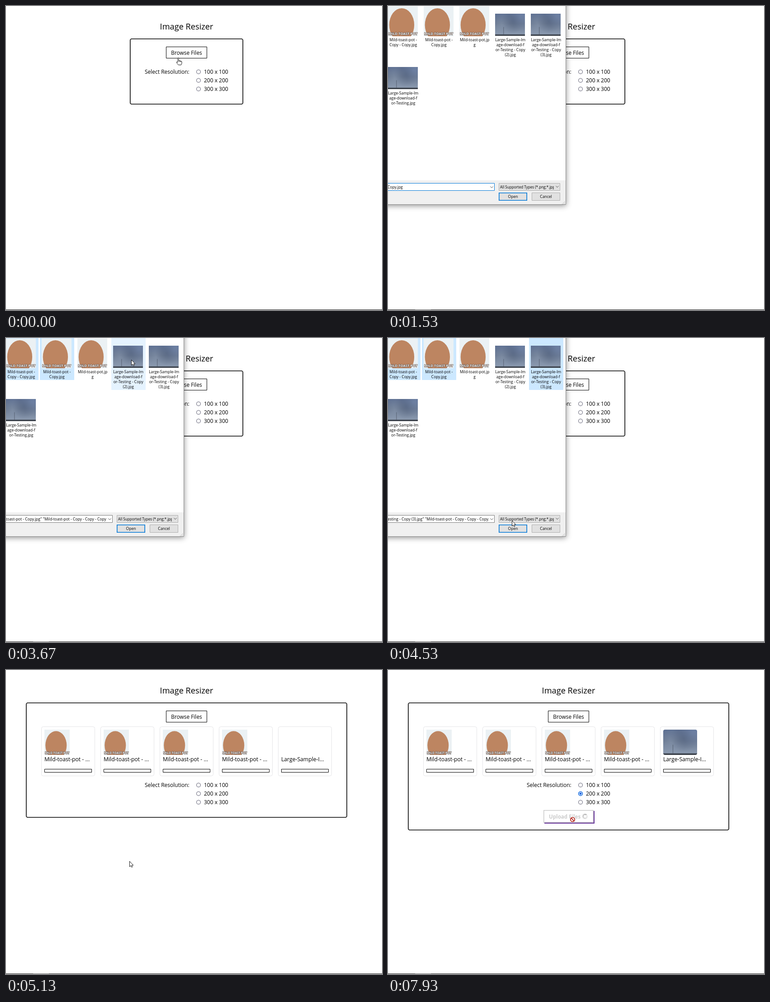
Write an HTML page with a canvas that moves like this. It is 832 px wide and 673 px high and loops after 8000 ms.

```html
<!DOCTYPE html>
<html lang="en">
<head>
<meta charset="utf-8">
<title>Image Resizer</title>
<style>
html, body { margin: 0; width: 100%; height: 100%; overflow: hidden; background: #fff; }
canvas { display: block; }
</style>
</head>
<body>
<canvas id="stage" width="832" height="673"></canvas>
<script>
const ctx = document.getElementById('stage').getContext('2d');
const LOOP = 8000;
const NAME = 'Mild-toast-pot';
const clamp = v => Math.max(0, Math.min(1, v));
const ramp = (t, from, to) => clamp((t - from) / (to - from));

// Pointer waypoints: time, x, y of the tip.
const PATH = [
  [1930, -12, 40], [2130, 20, 44], [2330, 34, 46], [2600, 137, 77], [2730, 137, 77],
  [2800, 86, 54], [2870, 99, 44], [3330, 99, 44], [3800, 345, 50], [4070, 345, 50],
  [4530, 274, 404], [4680, 273, 422], [5130, 273, 423], [5330, 273, 423],
  [5730, 348, 306], [5800, 348, 306], [5870, 347, 292], [6200, 347, 292],
  [6270, 363, 288], [6670, 443, 267], [7070, 443, 267], [7530, 405, 325], [8000, 405, 325]
];
const ARROW = new Path2D('M.5 .5V12.5L3.2 10 5 13.7 6.9 12.9 5.2 9.2H8.7Z');
const HAND = new Path2D('M3.5 1.7a1.2 1.2 0 0 1 2.4 0V7l5 1q1.6 .4 1.6 2v3l-1.5 3.5h-6L1 11.6q-1-1.7.5-2l2 1.4ZM6 7v2M8.3 7.5v2M10.5 8v2');

function text(str, x, y, size = 12, { color = '#000', align = 'left', weight = '' } = {}) {
  ctx.font = `${weight} ${size}px "Open Sans", "Noto Sans", sans-serif`;
  ctx.textAlign = align;
  ctx.fillStyle = color;
  ctx.fillText(str, x, y);
}

function box(x, y, w, h, { fill, stroke, line = 1, radius = 0 } = {}) {
  const inset = stroke ? line / 2 : 0;
  ctx.beginPath();
  ctx.roundRect(x + inset, y + inset, w - 2 * inset, h - 2 * inset, radius);
  if (fill) { ctx.fillStyle = fill; ctx.fill(); }
  if (stroke) { ctx.strokeStyle = stroke; ctx.lineWidth = line; ctx.stroke(); }
}

function clipped(x, y, w, h, draw, radius = 0) {
  ctx.save();
  ctx.beginPath();
  ctx.roundRect(x, y, w, h, radius);
  ctx.clip();
  draw();
  ctx.restore();
}

function ellipse(x, y, rx, ry, color) {
  ctx.beginPath();
  ctx.ellipse(x, y, rx, ry, 0, 0, 7);
  ctx.fillStyle = color;
  ctx.fill();
}

function portrait(x, y, s) {
  clipped(x, y, s, s, () => {
    box(x, y, s, s, { fill: '#ebf1f4' });
    ellipse(x + s * .46, y + s * .62, s * .42, s * .56, '#bd8561');
    ctx.font = `bold ${s * .118}px "Open Sans", sans-serif`;
    ctx.textAlign = 'center';
    ctx.strokeStyle = '#5a4a42';
    ctx.lineWidth = 1.4;
    ctx.lineJoin = 'round';
    const caption = NAME.replaceAll('-', ' ').toUpperCase();
    ctx.strokeText(caption, x + s / 2, y + s * .96);
    ctx.fillStyle = '#fff';
    ctx.fillText(caption, x + s / 2, y + s * .96);
  });
}

function landscape(x, y, w, h, radius) {
  clipped(x, y, w, h, () => {
    const sky = ctx.createLinearGradient(0, y, 0, y + h);
    [[0, '#5f7193'], [.45, '#67768f'], [.92, '#8a99af'], [.95, '#454c57'], [1, '#2c3139']]
      .forEach(([stop, color]) => sky.addColorStop(stop, color));
    box(x, y, w, h, { fill: sky });
    const glow = (cx, cy, color) => {
      const light = ctx.createRadialGradient(x + w * cx, y + h * cy, 0, x + w * cx, y + h * cy, w * .4);
      light.addColorStop(0, color + '70');
      light.addColorStop(1, color + '00');
      box(x, y, w, h * .93, { fill: light });
    };
    glow(.25, .5, '#94a3b8');
    glow(.85, .15, '#8298c0');
    glow(.6, .35, '#4b5a75');
    box(x + w * .28, y + h * .6, .7, h * .34, { fill: '#434c5a' });
  }, radius);
}

function radio(x, y, state) {
  const color = { on: '#0060df', pressed: '#4f4f5b' }[state] || '#8f8f9d';
  ctx.beginPath();
  ctx.arc(x, y, 4.4, 0, 7);
  ctx.strokeStyle = color;
  ctx.lineWidth = 1.5;
  ctx.stroke();
  if (state) ellipse(x, y, 2.4, 2.4, state === 'on' ? color : '#cfcfd8');
}

function uploadButton(t) {
  const busy = t >= 7730;
  const w = busy ? 111 : 93, h = busy ? 28 : 27;
  const x = busy ? 344 : 353, y = 310;
  box(x + 2, y + 2, w, h, { fill: 'rebeccapurple' });
  box(x, y, w, h, { fill: '#fff', stroke: busy ? '#ccc' : 'rebeccapurple', line: 1.6 });
  text('Upload Files', x + 12, y + 18.5, 11.6, { color: busy ? '#ccc' : 'rebeccapurple', weight: 'bold' });
  if (!busy) return;
  const turn = Math.floor(t / 83);
  ctx.lineWidth = 1;
  for (let i = 0; i < 12; i++) {
    const a = i * Math.PI / 6, c = Math.cos(a), s = Math.sin(a);
    ctx.strokeStyle = `rgba(70,70,70,${.25 + ((i - turn) % 12 + 12) % 12 / 16})`;
    ctx.beginPath();
    ctx.moveTo(436 + 3.2 * c, 324 + 3.2 * s);
    ctx.lineTo(436 + 6 * c, 324 + 6 * s);
    ctx.stroke();
  }
}

function page(t) {
  const filled = t >= 5000, ready = t >= 7070, shift = filled ? 109 : 0;
  text('Image Resizer', 399.5, 52, 18.2, { align: 'center' });
  const height = t >= 7730 ? 283 : ready ? 282 : filled ? 255 : 146;
  box(filled ? 44 : 274, 72, filled ? 711 : 251, height, { stroke: '#000', line: 1.6, radius: 3.5 });
  box(354, 90, 91, 26, { stroke: '#000' });
  text('Browse Files', 399.5, 108, 11.9, { align: 'center' });

  for (let i = 0; filled && i < 5; i++) {
    const x = Math.round(77.6 + i * 131.2);
    box(x, 125, 119, 110, { stroke: '#e4e4e7', radius: 4 });
    if (i < 4) portrait(x + 7, 132, 56);
    else if (t >= 5330) landscape(x + 7, 132, 75, 56, 4);
    text(i < 4 ? NAME + ' - ...' : 'Large-Sample-I...', x + 7, 202, 12.2);
    box(x + 7, 219, 105, 8, { stroke: '#000' });
  }

  text('Select Resolution:', 307, 149.5 + shift);
  [100, 200, 300].forEach((size, i) => {
    const y = 145.7 + i * 19 + shift;
    radio(426, y, i === 1 && (ready ? 'on' : t >= 6870 && 'pressed'));
    text(`${size} x ${size}`, 438, y + 4);
  });
  if (ready) uploadButton(t);

  box(0, 672, 832, 1, { fill: '#1c1c1c' });
  if (t >= 70) box(60, 672, 35, 1, { fill: '#5c5c5c' });
}

const sample = end => ['Large-Sample-Im', 'age-download-f', ...end];
const FILES = [
  { x: 0, y: 1, label: [NAME + ' -', 'Copy - Copy.jpg'], selectedAt: 2330 },
  { x: 79, y: 1, label: [NAME + ' -', 'Copy.jpg'], selectedAt: 3200 },
  { x: 158, y: 1, label: [NAME + '.jp', 'g'] },
  { x: 237, y: 1, wide: true, label: sample(['or-Testing - Copy', '(2).jpg']) },
  { x: 316, y: 1, wide: true, label: sample(['or-Testing - Copy', '(3).jpg']), selectedAt: 3930 },
  { x: 0, y: 119, wide: true, label: sample(['or-Testing.jpg']) }
];

function fileItem(file, t, pointer) {
  const { x, y, label, wide } = file;
  const left = x - 4, top = y - 6, h = 76 + 11 * label.length;
  const hover = pointer && pointer.x >= left && pointer.x < left + 76 && pointer.y >= top && pointer.y < top + h;
  if (t >= file.selectedAt) box(left, top, 76, h, { fill: '#cce8ff', stroke: hover ? '#99d1ff' : '#cce8ff' });
  else if (hover) box(left, top, 76, h, { fill: '#e5f3ff' });
  if (t >= 530) wide ? landscape(x, y + 16, 66, 49) : portrait(x, y, 66);
  label.forEach((line, i) => text(line, x + 33.7, y + 76.5 + i * 11, 8.5, { align: 'center' }));
}

function fieldText(t) {
  if (t < 1530) return '';
  if (t < 2330) return 'Copy.jpg';
  if (t < 3200) return `${NAME.slice(2)} - Copy - Copy - Copy - Copy.jpg" "${NAME} - Copy`;
  if (t < 3930) return `${NAME.slice(5)} - Copy.jpg" "${NAME} - Copy - Copy - Copy - Copy.jpg"`;
  return `esting - Copy (3).jpg" "${NAME} - Copy - Copy - Copy.jpg"`;
}

function chevron(x, y) {
  ctx.beginPath();
  ctx.moveTo(x - 3, y - 1.5);
  ctx.lineTo(x, y + 1.5);
  ctx.lineTo(x + 3, y - 1.5);
  ctx.strokeStyle = '#444';
  ctx.lineWidth = 1;
  ctx.stroke();
}

function dialog(t, pointer) {
  ctx.save();
  ctx.globalAlpha = ramp(t, 230, 470) * (1 - ramp(t, 4900, 5060));
  ctx.shadowColor = 'rgba(0,0,0,.45)';
  ctx.shadowBlur = 12;
  ctx.shadowOffsetY = 2;
  box(-40, -40, 434, 480, { fill: '#fff' });
  ctx.shadowColor = 'transparent';
  FILES.forEach(file => fileItem(file, t, pointer));

  box(-1, 386, 395, 54, { fill: '#f0f0f0' });
  box(-40, -40, 434, 480, { stroke: '#8a8a8a' });
  const fade = ramp(t, 1530, 1730);
  const mix = (a, b) => Math.round(a + (b - a) * fade);
  box(-9, 392, 245, 17, { fill: '#fff', stroke: `rgb(${mix(0, 122)},${mix(120, 122)},${mix(215, 122)})` });
  clipped(0, 392, 223, 17, () => text(fieldText(t), -1, 404, 8.5));
  chevron(229.5, 401);
  box(245, 392, 136, 17, { fill: '#e1e1e1', stroke: '#adadad' });
  clipped(246, 392, 121, 17, () => text('All Supported Types (*.png;*.jpg;*.jpeg)', 248, 403.5, 8.1));
  chevron(374.5, 400);

  const hot = t >= 4600;
  box(245, 413, 63, 18, { fill: hot ? '#e5f1fb' : '#e1e1e1', stroke: '#0078d7', line: 1.6 });
  text('Open', 276.5, 425, 8.5, { align: 'center' });
  box(318, 413, 63, 18, { fill: '#e1e1e1', stroke: '#adadad' });
  text('Cancel', 349.5, 425, 8.5, { align: 'center' });
  for (let i = 0; i < 3; i++)
    for (let j = 0; j <= i; j++) box(390 - j * 2.5, 432.5 + i * 2.5, 1.3, 1.3, { fill: '#b5b5b5' });
  ctx.restore();
}

function pointerAt(t) {
  if (t < 70) return { x: 381, y: 114, kind: 'hand' };
  const next = PATH.findIndex(point => point[0] > t);
  if (next < 1) return null;
  const [t0, x0, y0] = PATH[next - 1], [t1, x1, y1] = PATH[next];
  const k = (t - t0) / (t1 - t0);
  const x = x0 + (x1 - x0) * k, y = y0 + (y1 - y0) * k;
  const onButton = t > 7070 && y >= 310;
  return { x, y, kind: t >= 7800 ? 'blocked' : onButton ? 'hand' : 'arrow' };
}

function drawPointer({ x, y, kind }) {
  ctx.save();
  ctx.translate(Math.round(x), Math.round(y));
  if (kind === 'blocked') {
    ctx.beginPath();
    ctx.arc(3.5, 6, 4.7, 0, 7);
    ctx.moveTo(.2, 2.7);
    ctx.lineTo(6.8, 9.3);
    for (const [color, width] of [['#fff', 3.5], ['#b3261e', 1.8]]) {
      ctx.strokeStyle = color;
      ctx.lineWidth = width;
      ctx.stroke();
    }
  } else {
    const shape = kind === 'hand' ? HAND : ARROW;
    if (kind === 'hand') ctx.translate(-4.5, 0);
    ctx.fillStyle = '#fff';
    ctx.strokeStyle = '#000';
    ctx.lineWidth = .9;
    ctx.fill(shape);
    ctx.stroke(shape);
  }
  ctx.restore();
}

const start = performance.now();
function render(now) {
  const t = Math.max(0, now - start) % LOOP;
  const pointer = pointerAt(t);
  ctx.fillStyle = '#fff';
  ctx.fillRect(0, 0, 832, 673);
  page(t);
  if (t > 230 && t < 5060) dialog(t, pointer);
  if (pointer) drawPointer(pointer);
  requestAnimationFrame(render);
}
requestAnimationFrame(render);
</script>
</body>
</html>
```
